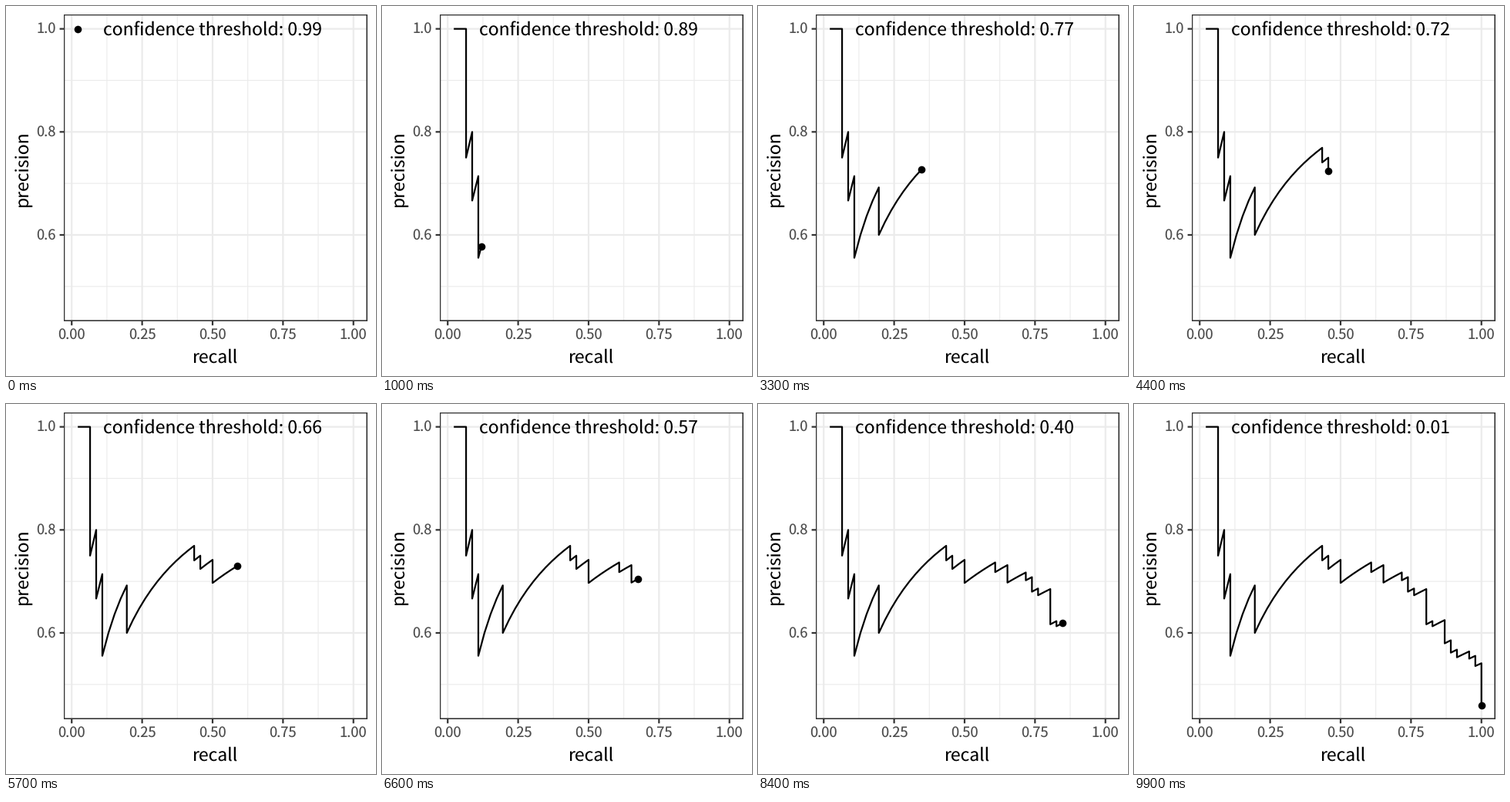
A matplotlib script that plays this animation: 480 px wide and 480 px high, repeating every 10000 ms.

```python
import matplotlib.pyplot as plt
import numpy as np
from matplotlib.animation import FuncAnimation
from matplotlib.patches import Rectangle

plt.rcParams["font.family"] = "Noto Sans CJK JP"
plt.rcParams["text.hinting"] = "none"

SIZE, DPI, FRAMES = 480, 150, 100
PX = 72 / DPI
LW = 2.22 * PX
GRID, DARK, TICK_TEXT = "#ebebeb", "#333333", "#4d4d4d"
LEFT, TOP, RIGHT, BOTTOM = 75.3, 11.6, 468.6, 408.6
POSITIVES = 46

# False positives that follow the k-th true positive
MISSES = {3: 1, 4: 1, 5: 2, 9: 2, 20: 1, 21: 1, 23: 2, 28: 1, 30: 2, 33: 1,
          34: 2, 35: 1, 37: 6, 38: 1, 40: 5, 41: 3, 42: 2, 44: 2, 45: 3, 46: 15}

hits = np.repeat(np.arange(1, POSITIVES + 1),
                 [1 + MISSES.get(k, 0) for k in range(1, POSITIVES + 1)])
count = np.arange(1, len(hits) + 1)
recall = hits / POSITIVES
precision = hits / count
threshold = np.interp(count, [1, 17, 29, 37, 51, 63, 100],
                      [0.99, 0.81, 0.72, 0.66, 0.48, 0.40, 0.01])
# The curve is revealed along recall, each step landing on a whole frame
when = np.round((hits - 1) * (FRAMES - 1) / (POSITIVES - 1))


def to_x(r):
    low = 1 / POSITIVES
    pad = 0.05 * (1 - low)
    return LEFT + (r - low + pad) / (1 - low + 2 * pad) * (RIGHT - LEFT)


def to_y(p):
    low = 0.46
    pad = 0.05 * (1 - low)
    return BOTTOM - (p - low + pad) / (1 - low + 2 * pad) * (BOTTOM - TOP)


fig = plt.figure(figsize=(SIZE / DPI, SIZE / DPI), dpi=DPI, facecolor="white")
ax = fig.add_axes([0, 0, 1, 1])
ax.set_xlim(0, SIZE)
ax.set_ylim(SIZE, 0)
ax.axis("off")


def rule(xs, ys, color, width, z):
    ax.plot(xs, ys, color=color, lw=width, zorder=z,
            solid_capstyle="butt", snap=False)


def put(x, y, text, size=11, color="black", **kw):
    return ax.text(x, y, text, fontsize=size, color=color, ha="left",
                   va="baseline", zorder=6, **kw)


def block(x0, y0, x1, y1):
    ax.add_patch(Rectangle((x0, y0), x1 - x0, y1 - y0, fc=DARK, lw=0,
                           zorder=7, snap=False))


for r in (0.125, 0.375, 0.625, 0.875):
    rule([to_x(r)] * 2, [TOP, BOTTOM], GRID, LW / 2, 1)
for p in (0.5, 0.7, 0.9):
    rule([LEFT, RIGHT], [to_y(p)] * 2, GRID, LW / 2, 1)

for r in (0, 0.25, 0.5, 0.75, 1):
    x = to_x(r)
    rule([x, x], [TOP, BOTTOM], GRID, LW, 2)
    rule([x, x], [BOTTOM, BOTTOM + 5.7], DARK, LW, 3)
    put(x - 17.8, 433, f"{r:.2f}", 8.8, TICK_TEXT)
for p in (0.6, 0.8, 1):
    y = to_y(p)
    rule([LEFT, RIGHT], [y, y], GRID, LW, 2)
    rule([LEFT - 5.7, LEFT], [y, y], DARK, LW, 3)
    put(39.6, y + 6.6, f"{p:.1f}", 8.8, TICK_TEXT)

# Panel border, clipped to the panel
block(75, 11, 76.3, 409)
block(75, 11, 469, 12.3)
block(467.4, 11, 469, 409)
block(75, 407.4, 469, 409)

put(241.6, 463, "recall")
put(29, 259.5, "precision", rotation=90, rotation_mode="anchor")

curve, = ax.plot([], [], color="black", lw=LW, zorder=4, snap=False,
                 solid_capstyle="butt", solid_joinstyle="round")
dot, = ax.plot([], [], "o", color="black", ms=9.65 * PX, mew=0, zorder=5)
label = put(125.8, 38, "", 11.04)


def draw(i):
    last = np.searchsorted(when, i, side="right") - 1
    nxt = min(last + 1, len(when) - 1)
    t = (i - when[last]) / (when[nxt] - when[last]) if nxt > last else 0
    r = recall[last] + t * (recall[nxt] - recall[last])
    p = precision[last] + t * (precision[nxt] - precision[last])
    curve.set_data(to_x(np.append(recall[:last + 1], r)),
                   to_y(np.append(precision[:last + 1], p)))
    dot.set_data([to_x(r)], [to_y(p)])
    value = threshold[nxt if t >= 0.5 else last]
    label.set_text(f"confidence threshold: {value:.2f}")
    return curve, dot, label


anim = FuncAnimation(fig, draw, frames=FRAMES, interval=100, repeat=True,
                     repeat_delay=0, init_func=lambda: draw(0))
plt.show()
```
